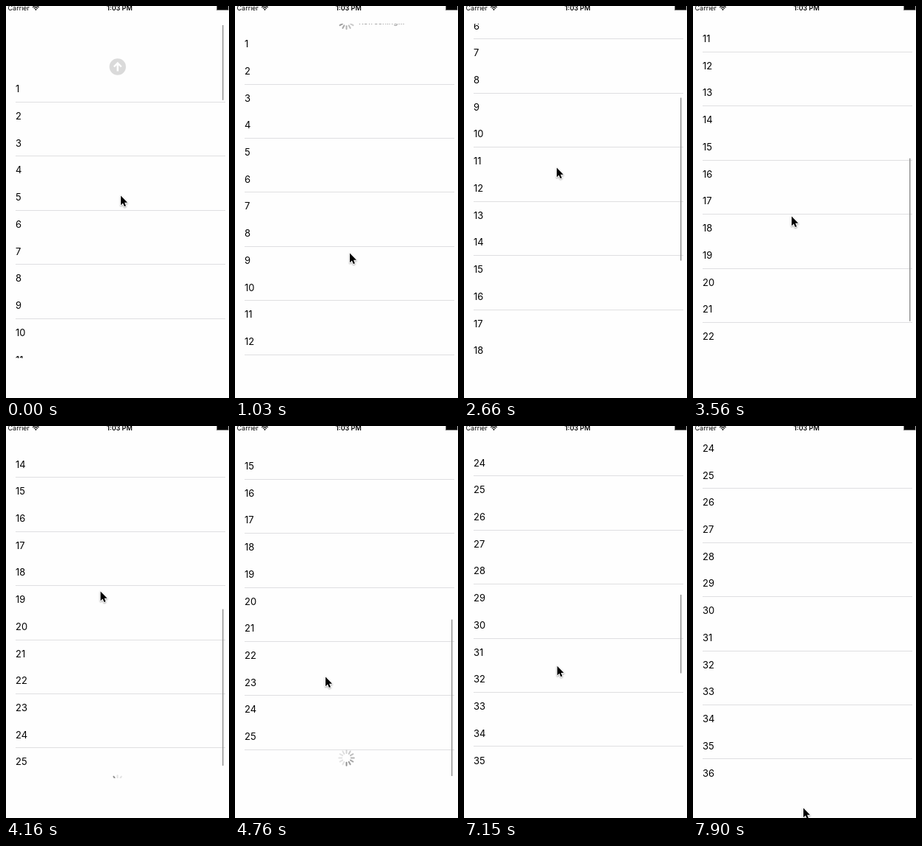
Write an HTML page with a canvas that moves like this. It is 303 by 532 pixels and loops after 8 s.

```html
<!DOCTYPE html>
<html lang="en">
<head>
<meta charset="utf-8">
<title>Pull to refresh list</title>
<style>
  html, body { margin: 0; width: 100%; height: 100%; overflow: hidden; background: #fefefe; }
  canvas { display: block; width: 303px; height: 532px; }
</style>
</head>
<body>
<canvas id="stage"></canvas>
<script>
const W = 303, H = 532, LOOP = 8000, TICK = 149;
const TOP = 24, VIEW = 454, ROW = 36.72, REST = 42.4;
const REFRESHED = 7, LOADING = 28, LOADED = 34;
const FONT = 'Inter, Roboto, "Liberation Sans", sans-serif';
const canvas = document.getElementById('stage');
const ctx = canvas.getContext('2d');
const dpr = window.devicePixelRatio || 1;
canvas.width = W * dpr;
canvas.height = H * dpr;

const clamp = (v, lo = 0, hi = 1) => Math.min(hi, Math.max(lo, v));
const linear = p => p;
const easeOut = p => p * (2 - p);
const easeInOut = p => p * p * (3 - 2 * p);

// Share of a move that is done at tick k.
const move = (k, from, to, ease = linear) => ease(clamp((k - from) / (to - from)));

// Position of the first row: pull, snap back, then drags that glide out.
function firstRow(k) {
  return 112.5 + 20 * move(k, 0, 2)
    - 54.5 * move(k, 2, 5, easeOut)
    - 35.6 * move(k, 6, 8, easeOut)
    - 199.2 * move(k, 13, 18)
    - 89.1 * move(k, 18, 22, easeOut)
    - 214 * move(k, 22, 32, easeOut)
    - 177 * move(k, 36, 42)
    - 177.6 * move(k, 42, 51, easeOut);
}

function pointerAt(k) {
  const x = 156 - 28 * move(k, 8, 12) - 2 * move(k, 13, 18) + 8 * move(k, 18, 21)
    - 11 * move(k, 24, 32) - 13 * move(k, 32, 42) + 40 * move(k, 44, 53, easeInOut);
  const y = 257 + 78 * move(k, 0, 3, easeOut)
    + 95 * move(k, 7, 12) - 211 * move(k, 13, 18)
    + 126 * move(k, 19, 22) - 60 * move(k, 22, 24)
    - 90 * move(k, 24, 27) + 145 * move(k, 27, 32)
    + 73 * move(k, 32, 34) - 177 * move(k, 36, 42)
    + 282 * move(k, 45, 53, easeInOut);
  return [x, y];
}

const barAlpha = k => 1 - move(k, 3, 5) + move(k, 13, 14) - move(k, 32, 34)
  + move(k, 36, 37) - move(k, 51, 53);

function text(str, x, y, font, color = '#000') {
  ctx.font = font + ' ' + FONT;
  ctx.fillStyle = color;
  ctx.fillText(str, x, y);
}

function statusBar() {
  text('Carrier', 2.5, 6, '9px');
  text('1:03 PM', 137, 6, '600 9px');
  ctx.fillStyle = '#777';
  ctx.fillRect(286, 0, 16.5, 6);
  ctx.fillStyle = ctx.strokeStyle = '#000';
  ctx.fillRect(287, 0, 15, 5);
  ctx.lineWidth = 1.2;
  for (const r of [3.5, 5.7]) {
    ctx.beginPath();
    ctx.arc(40.5, 5.7, r, -Math.PI * 0.77, -Math.PI * 0.23);
    ctx.stroke();
  }
  ctx.beginPath();
  ctx.moveTo(40.5, 6);
  ctx.arc(40.5, 6, 2, -Math.PI * 0.77, -Math.PI * 0.23);
  ctx.fill();
}

function arrowBadge(x, y) {
  ctx.fillStyle = '#dadada';
  ctx.beginPath();
  ctx.arc(x, y, 11.2, 0, Math.PI * 2);
  ctx.fill();
  ctx.strokeStyle = '#fefefe';
  ctx.lineWidth = 2.4;
  ctx.stroke(new Path2D(`M${x} ${y + 6}v-10.5M${x - 5} ${y}l5 -5l5 5`));
}

function spinner(x, y, t) {
  const head = Math.floor(t * 0.012) - 3;
  ctx.save();
  ctx.translate(x, y);
  ctx.lineWidth = 2;
  ctx.lineCap = 'round';
  for (let i = 0; i < 12; i++) {
    const age = (head - i + 24) % 12;
    const shade = Math.min(226, 146 + age * 11);
    ctx.strokeStyle = `rgb(${shade},${shade},${shade})`;
    ctx.beginPath();
    ctx.moveTo(0, -6.3);
    ctx.lineTo(0, -10.3);
    ctx.stroke();
    ctx.rotate(Math.PI / 6);
  }
  ctx.restore();
}

function header(k, t, first) {
  if (k < 3) arrowBadge(151.7, first - 30);
  else if (k <= REFRESHED) {
    spinner(151.5, first - 30.3, t);
    text('Refreshing...', 168, first - 26.5, '10.5px', '#8c8c8c');
  }
}

function list(k, t) {
  const first = firstRow(k), offset = REST - first;
  const short = k >= REFRESHED && k < LOADED;
  const count = short ? 25 : 50;
  // Only every second hairline survives the downscaling.
  const skip = Math.abs(Math.floor(offset / 60)) % 2;

  ctx.save();
  ctx.beginPath();
  ctx.rect(0, TOP, W, VIEW);
  ctx.clip();
  header(k, t, first);
  for (let n = 1; n <= count; n++) {
    const y = first + (n - 1) * ROW;
    if (y < 0 || y > 500) continue;
    text(n, 13, Math.floor(y + 5.3), '13px');
    if (n % 2 !== skip) {
      ctx.fillStyle = '#dfdfe1';
      ctx.fillRect(13, Math.floor(y + 18), 285, 1);
    }
  }
  if (short) spinner(151.5, first + 24 * ROW + 29, t);
  scrollBar(k, offset, (count + (k >= LOADING)) * ROW);
  ctx.restore();
}

function scrollBar(k, offset, content) {
  const len = VIEW * VIEW / content - 3.5 - Math.max(0, -offset) * 0.1;
  const y = Math.min(26 + Math.max(0, offset) * VIEW / content, 475 - len);
  ctx.globalAlpha = barAlpha(k);
  ctx.fillStyle = '#8f8f8f';
  ctx.fillRect(294, y, 1.4, len);
  ctx.globalAlpha = 1;
}

const arrow = new Path2D('M0 0V14.2L3.2 11.2L5.4 16.2L7.7 15.2L5.6 10.3H10Z');
function cursor(x, y) {
  ctx.save();
  ctx.translate(x, y + 0.5);
  ctx.scale(0.9, 0.9);
  ctx.lineJoin = 'round';
  ctx.shadowColor = 'rgba(0,0,0,.35)';
  ctx.shadowBlur = 2 * dpr;
  ctx.shadowOffsetY = dpr;
  ctx.strokeStyle = '#fff';
  ctx.lineWidth = 2;
  ctx.stroke(arrow);
  ctx.shadowColor = 'transparent';
  ctx.fillStyle = '#000';
  ctx.fill(arrow);
  ctx.restore();
}

function draw(now) {
  const k = Math.floor((now % LOOP + 25) / TICK);
  ctx.setTransform(dpr, 0, 0, dpr, 0, 0);
  ctx.fillStyle = '#fefefe';
  ctx.fillRect(0, 0, W, H);
  statusBar();
  list(k, k * TICK);
  cursor(...pointerAt(k));
}

const began = performance.now();
function loop() {
  draw(performance.now() - began);
  requestAnimationFrame(loop);
}
loop();
</script>
</body>
</html>
```
